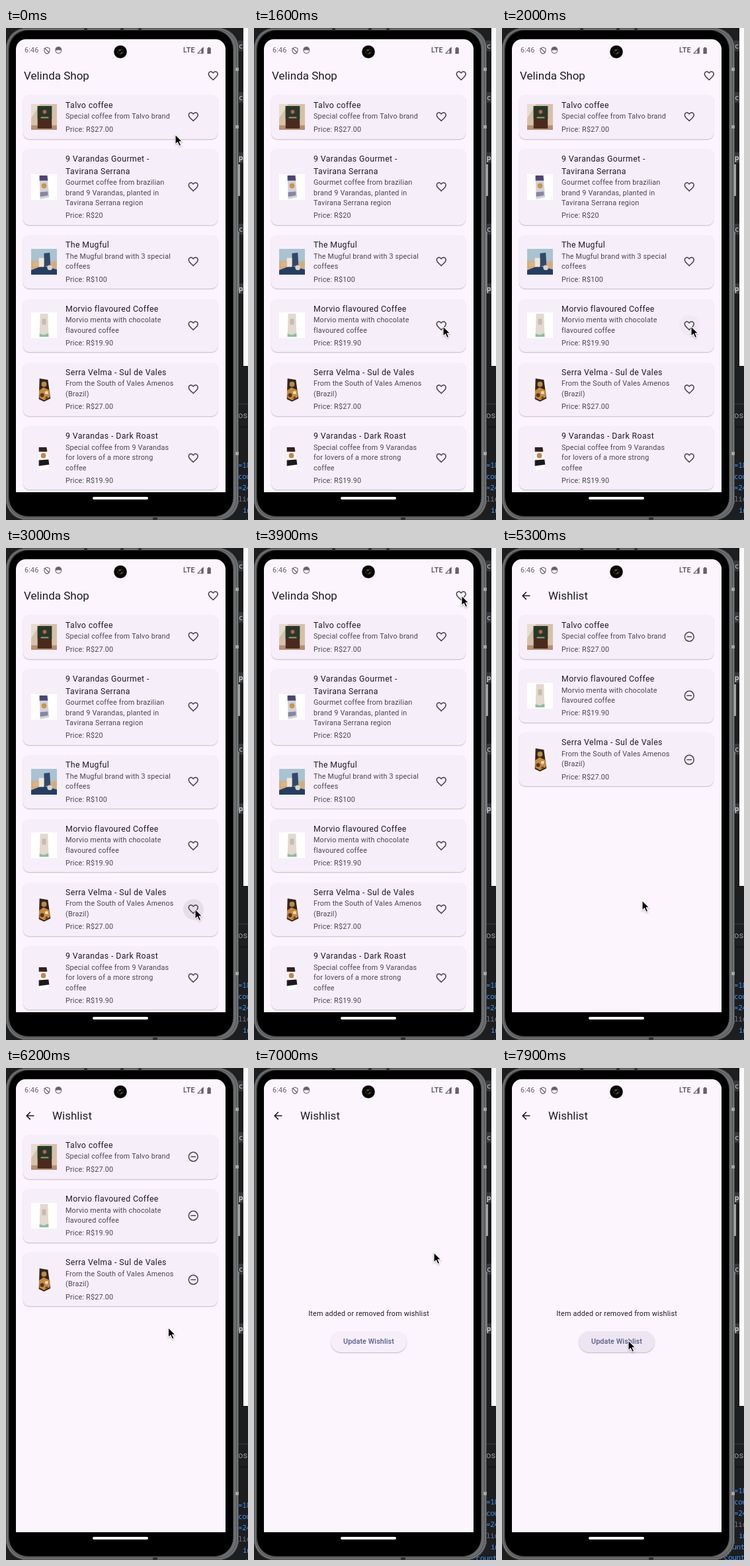
An HTML page for the animation above (8 s loop, 366 px wide and 744 px high).

```html
<!DOCTYPE html>
<html lang="en">
<head>
<meta charset="utf-8">
<title>Wishlist demo</title>
<style>
html, body { margin: 0; width: 100%; height: 100%; overflow: hidden; background: #1d1e20; }
#stage { position: relative; width: 366px; height: 744px; overflow: hidden; background: #1d1e20;
  font: 10.8px/15.4px Roboto, sans-serif; letter-spacing: .19px; color: #49454f; }
#stage div, #stage svg, #stage i { position: absolute; }
.code { font: 11px/17px "Noto Sans Mono", monospace; letter-spacing: -.3px; white-space: pre; }
.phone { left: 0; top: 0; width: 352px; height: 744px; border-radius: 31px; background: #6c6d6e;
  box-shadow: inset 0 0 0 1px #3a3b3c, inset 0 0 0 2px #8b8c8d, inset 0 0 0 4px #5b5c5d; }
.glass { left: 5px; top: 4px; width: 338px; height: 734px; border-radius: 28px; background: #000;
  box-shadow: 0 0 0 1px #292a2b; }
.screen { left: 15px; top: 17px; width: 317px; height: 685px; border-radius: 15px 15px 0 0; overflow: hidden; background: #000; }
.page { inset: 0; background: #fcf5fe; }
#scrim { inset: 0; background: #000; }
.head { top: 43px; font-size: 17px; line-height: 25px; letter-spacing: 0; color: #1d1b20; white-space: nowrap; }
.list { left: 11px; top: 84px; width: 294px; }
#stage .card { position: relative; display: flex; align-items: center; box-sizing: border-box; min-height: 66.5px;
  margin-bottom: 15.6px; padding: 6px 0 6px 64px; border-radius: 9px; background: #f6effa;
  box-shadow: 0 1px 1.5px rgba(0, 0, 0, .24); white-space: pre; }
.card b { display: block; font-weight: 400; font-size: 12.33px; line-height: 18.5px; letter-spacing: .386px; color: #1d1b20; }
.card p { margin: 0 0 4px; }
.photo { left: 12px; top: 50%; width: 39px; height: 39px; margin-top: -19.5px; }
.btn { width: 0; height: 0; }
.card .btn { left: 257px; top: 50%; }
.btn svg { left: -9.25px; top: -9.25px; width: 18.5px; height: 18.5px; fill: #49454f; }
.btn i { left: -15.5px; top: -15.5px; width: 31px; height: 31px; border-radius: 50%; background: #49454f; }
#note { inset: 70px 0 0; background: #fcf5fe; text-align: center; }
#note p { position: absolute; top: 277.3px; width: 100%; margin: 0; color: #1d1b20; }
#update { left: 101px; top: 311px; width: 115px; height: 32px; border-radius: 16px; line-height: 32px; font-weight: 500;
  letter-spacing: .08px; color: #565c87; box-shadow: 0 1px 1.5px rgba(0, 0, 0, .25); }
.status { top: 26px; color: #66626a; letter-spacing: .1px; }
</style>
</head>
<body>
<div id="stage"></div>
<script>
const heartPath = 'M16.5 3c-1.74 0-3.41.81-4.5 2.09C10.91 3.81 9.24 3 7.5 3 4.42 3 2 5.42 2 8.5c0 3.78 3.4 6.86 8.55 11.54L12 21.35l1.45-1.32C18.6 15.36 22 12.28 22 8.5 22 5.42 19.58 3 16.5 3zm-4.4 15.55l-.1.1-.1-.1C7.14 14.24 4 11.39 4 8.5 4 6.5 5.5 5 7.5 5c1.54 0 3.04.99 3.57 2.36h1.87C13.46 5.99 14.96 5 16.5 5c2 0 3.5 1.5 3.5 3.5 0 2.89-3.14 5.74-7.9 10.05z';
const heart = `<path d="${heartPath}"/>`;
const minus = '<path d="M7 12h10M21 12a9 9 0 1 1-18 0a9 9 0 1 1 18 0z" fill="none" stroke="#49454f" stroke-width="2"/>';
const arrow = '<path d="M20 11H7.83l5.59-5.59L12 4l-8 8 8 8 1.41-1.41L7.83 13H20z" fill="#1d1b20"/>';

const rect = (x, y, w, h, fill) => `<rect x="${x}" y="${y}" width="${w}" height="${h}" fill="${fill}"/>`;
const dot = (x, y, r, fill) => `<circle cx="${x}" cy="${y}" r="${r}" fill="${fill}"/>`;
const shape = (d, fill) => `<path d="${d}" fill="${fill}"/>`;

const items = [
  { name: 'Talvo coffee', text: 'Special coffee from Talvo brand', price: '27.00',
    photo: rect(0, 0, 40, 40, '#d6c1a9') + shape('M0 0h14L0 22z', '#e8dccd') + rect(0, 33, 40, 7, '#b58f72') +
      shape('M10 3h22v35H10z', '#4b2a1e') + rect(10, 3, 22, 20, '#27382a') + dot(21, 12, 3, '#b0653a') + rect(15, 20, 12, 2, '#a9967c') },
  { name: '9 Varandas Gourmet -\nTavirana Serrana', text: 'Gourmet coffee from brazilian\nbrand 9 Varandas, planted in\nTavirana Serrana region', price: '20',
    photo: rect(0, 0, 40, 40, '#fff') + shape('M13 2h12l3 34-14 3z', '#d3d1da') + shape('M13 2h12l1 8H13z', '#4a4678') +
      dot(20, 18, 4, '#c79549') + shape('M14 28l12-1v6l-12 2z', '#85869f') },
  { name: 'The Mugful', text: 'The Mugful brand with 3 special\ncoffees', price: '100',
    photo: rect(0, 0, 40, 40, '#a9c3d1') + rect(0, 19, 40, 14, '#cfae83') + shape('M0 33l18-7 22 6v8H0z', '#243d63') +
      shape('M20 7l9-1 1 20-10 1z', '#31486c') + rect(12, 14, 8, 14, '#efe6d6') + dot(7, 24, 4, '#e1b47c') + dot(29, 29, 4, '#d9d2c5') },
  { name: 'Morvio flavoured Coffee', text: 'Morvio menta with chocolate\nflavoured coffee', price: '19.90',
    photo: rect(0, 0, 40, 40, '#fff') + shape('M14 2h12l1 36H13z', '#e4d8cf') + rect(17, 10, 6, 9, '#c9b9ae') +
      shape('M13 33l7 2 7-3v6H13z', '#8dbba2') },
  { name: 'Serra Velma - Sul de Vales', text: 'From the South of Vales Amenos\n(Brazil)', price: '27.00',
    photo: shape('M13 3l13 2 4 29-10 5-8-4z', '#33251c') + shape('M12 22l7-5 9 4 1 11-9 5-7-4z', '#c98a39') +
      dot(20, 12, 4, '#b98a4a') + dot(17, 29, 3, '#4e3422') + dot(24, 25, 2.5, '#efe0bd') + dot(24, 33, 2, '#6d4423') },
  { name: '9 Varandas - Dark Roast', text: 'Special coffee from 9 Varandas\nfor lovers of a more strong\ncoffee', price: '19.90',
    photo: shape('M12 3h12l4 33-13 3-3-2z', '#fff') + shape('M12 3h12l1 7H12z', '#33211d') + dot(19, 16, 4, '#c08349') +
      shape('M12 23l15-1 1 8-16 2z', '#1e1a1b') }
];

const button = (id, icon, pos = '') => `<div class="btn" style="${pos}"><i id="${id}"></i><svg viewBox="0 0 24 24">${icon}</svg></div>`;
const card = (i, page, icon) => {
  const { name, text, price, photo } = items[i];
  return `<div class="card"><svg class="photo" viewBox="0 0 40 40">${photo}</svg><section><b>${name}</b><p>${text}</p>Price: R$${price}</section>${button(page + i, icon)}</div>`;
};
const cards = (list, page, icon) => `<div class="list">${list.map(i => card(i, page, icon)).join('')}</div>`;
const code = (x, y, text, color, weight = 500) =>
  `<div class="code" style="left:${x}px;top:${y - 9}px;color:${color};font-weight:${weight}">${text}</div>`;
const block = (x, y, w, h, color) => `<div style="left:${x}px;top:${y}px;width:${w}px;height:${h}px;background:${color}"></div>`;

const blue = '#3b95f5';
const logs = [[351, '=18', blue], [351, 'cou', blue], [351, '=24', blue], [351, 'lic', '#74758c'],
  [358, 'in', blue], [335.6, 'count', blue], [335.6, 'count', blue]];
const letters = [[27, 'c'], [105, 'c'], [196, 'p'], [304, 'c'], [394, 'p']];

document.getElementById('stage').innerHTML =
  letters.map(([y, s]) => block(351, y - 8, 8, 16, '#36383b') + code(352, y, s, '#c9cbd0', s === 'p' ? 700 : 400)).join('') +
  block(359, 0, 7, 511, '#fbfbfb') +
  block(350, 568, 16, 1, '#3b3c3e') + block(350, 603, 16, 1, '#111214') +
  '<div style="left:351px;top:578px;font-size:13px;color:#96989c">os</div>' +
  `<div id="logs">${logs.map(([x, s, c], i) => code(x, 661 + 16.9 * i, s, c)).join('')}</div>` +
  '<div class="phone"></div><div class="glass"></div>' +
  [118, 173, 200].map(x => block(x, 1, 5, 3, '#2b2c2d')).join('') + block(222, 740, 7, 3, '#2b2c2d') +
  [60, 147, 641].map(y => block(347, y, 5, 5, '#a5a6a7')).join('') +
  block(351, 206, 3, 48, '#a2a3a4') + block(351, 308, 2, 90, '#77787a') +
  `<div class="screen">
    <div class="page" id="shop"><div class="head" style="left:12px">Velinda Shop</div>
      ${button('open', heart, 'left:298px;top:55.3px')}${cards([0, 1, 2, 3, 4, 5], 'shop', heart)}</div>
    <div id="scrim"></div>
    <div class="page" id="wish"><div class="head" style="left:55px">Wishlist</div>
      ${button('back', arrow, 'left:21.5px;top:55.3px')}${cards([0, 3, 4], 'wish', minus)}
      <div id="note"><p>Item added or removed from wishlist</p><div id="update">Update Wishlist</div></div></div>
  </div>
  <div class="status" style="left:28px;font-size:11px">6:46</div>
  <div class="status" style="left:268px;font-size:10.6px;font-weight:600">LTE</div>
  <svg width="366" height="744" fill="none" stroke="#66626a" stroke-width="1.1">
    <path d="M62 29.3l4 1.5v3q0 3.6-4 5.2q-4-1.6-4-5.2v-3zM59 31l6.5 6.5"/>
    <circle cx="79.3" cy="34" r="4.3"/><path d="M75 33a4.3 4.3 0 0 1 8.6 0z" fill="#66626a"/>
    <path d="M290 38.3h8v-8.5z"/><path d="M296 38v-6l2-2v8z" fill="#66626a"/>
    <path d="M304.4 30.3h1.4v-1.2h2.6v1.2h1.4v8.7h-5.4z" fill="#66626a" stroke="none"/>
    <circle cx="173" cy="36" r="9.8" fill="#050505" stroke="none"/>
    <circle cx="173" cy="36" r="4.2" stroke="#29261a"/>
    <path d="M170.5 34.5q2-2 3.5-.5M173 38.5q2 0 3-2" stroke="#8f7a34"/>
    <rect x="131" y="709" width="84" height="4" rx="2" fill="#fff" stroke="none"/>
  </svg>
  <svg id="cursor" width="20" height="26" style="left:-2px;top:-2px;overflow:visible;filter:drop-shadow(0 1px 1px rgba(0,0,0,.3))">
    <path d="M2 2v15l3.5-3.2 2.6 5.7 2.6-1.2-2.5-5.5h4.6z" fill="#000" stroke="#fff" stroke-width="1.1"/></svg>`;

const el = id => document.getElementById(id);
const clamp = v => Math.max(0, Math.min(1, v));

// Pointer stops: time, x, y
const stops = [[0, 256, 161], [200, 256, 161], [700, 285, 136], [1000, 285, 136], [1500, 286, 451], [2200, 286, 451],
  [2800, 286, 546], [3200, 286, 546], [3700, 314, 72], [4200, 314, 72], [4400, 320, 70], [4700, 320, 70],
  [5200, 212, 533], [5800, 212, 533], [6650, 285, 226], [6800, 285, 226], [7000, 272, 279], [7700, 191, 412], [8000, 191, 412]];
const presses = [['shop0', 800], ['shop3', 1700], ['shop4', 2900], ['open', 4130], ['wish3', 6700]];
const OPEN = 4250, REMOVED = 6950, UPDATE = 7850;

function pointer(t) {
  const i = stops.findIndex(s => s[0] > t);
  const [t0, x0, y0] = stops[i - 1], [t1, x1, y1] = stops[i];
  const u = (t - t0) / (t1 - t0), e = u * u * (3 - 2 * u);
  return [x0 + (x1 - x0) * e, y0 + (y1 - y0) * e];
}

function draw(t) {
  const [x, y] = pointer(t);
  el('cursor').style.transform = `translate(${x}px,${y}px)`;

  for (const ripple of document.querySelectorAll('.btn i')) ripple.style.opacity = 0;
  for (const [id, at] of presses) {
    const age = t - at;
    el(id).style.opacity = .09 * clamp(age / 80) * clamp((350 - age) / 150);
  }

  const u = clamp((t - OPEN) / 300), e = 1 - (1 - u) ** 3.3;
  el('shop').style.transform = `scale(${1 + .05 * e})`;
  el('scrim').style.opacity = .6 * e;
  el('wish').style.transform = `scale(${.85 + .15 * e})`;
  el('wish').style.opacity = clamp((u - .125) / .125);

  el('note').style.display = t < REMOVED ? 'none' : 'block';
  el('update').style.background = t < UPDATE ? '#f6effa' : '#ede6f2';
  el('logs').style.top = (t < REMOVED ? 0 : t < UPDATE ? -5 : -22) + 'px';
}

const start = performance.now();
function tick() {
  draw((performance.now() - start) % 8000);
  requestAnimationFrame(tick);
}
tick();
</script>
</body>
</html>
```
